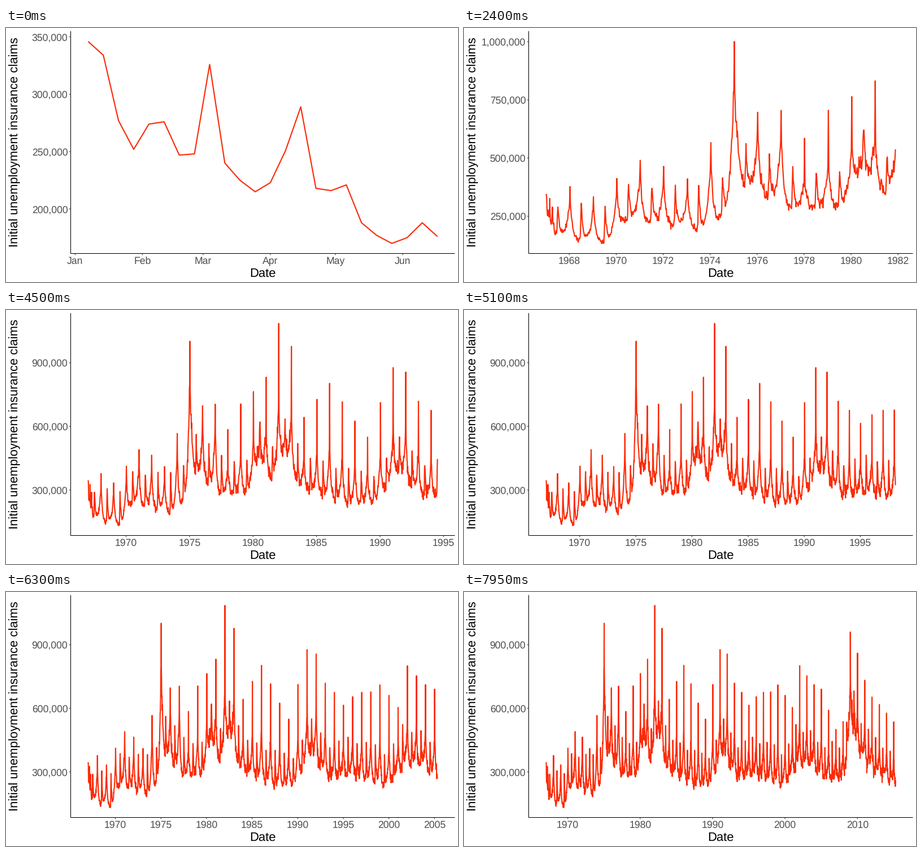
A matplotlib script that plays this animation: 800x450 px, repeating every 8000 ms.

```python
import math

import matplotlib.pyplot as plt
import numpy as np
from matplotlib.animation import FuncAnimation

plt.rcParams["font.family"] = "Liberation Sans"
plt.rcParams["path.simplify"] = False
plt.rcParams["text.hinting"] = "none"

W, H, DPI = 800, 450, 100
PX = 72 / DPI
LEFT, RIGHT, TOP, BOTTOM = 114.5, 794.5, 6, 399.5
START = np.datetime64("1967-01-07")
T0, PER_YEAR = 1967.0164, 52.1775
WEEKS_PER_STEP, STEPS = 47.05, 54

# Claims in thousands: the opening weeks, then turning points by year
OPENING = [346, 334, 277, 252, 274, 276, 247, 248, 326, 240, 225, 215,
           223, 251, 289, 218, 216, 221, 188, 177, 170, 175, 188, 176]
LOW = [(1967.4, 168), (1968.5, 142), (1969.7, 137), (1970.3, 228),
       (1971.6, 225), (1973.7, 182), (1974.7, 260), (1975.15, 490),
       (1975.45, 380), (1977.7, 275), (1979.7, 290), (1980.4, 460),
       (1981.5, 335), (1982.4, 500), (1983.7, 305), (1987.7, 230),
       (1989.7, 245), (1991.3, 385), (1993.7, 260), (1995.5, 285),
       (2000, 230), (2001.5, 330), (2003.5, 325), (2006, 255),
       (2008.2, 275), (2009.1, 580), (2010, 400), (2012, 310), (2015.3, 235)]
WINTER = [(1968, 373), (1969, 337), (1971, 500), (1973, 412), (1974, 584),
          (1975, 970), (1976, 709), (1977, 705), (1978, 580), (1979, 680),
          (1981, 840), (1982, 1074), (1983, 977), (1984, 638), (1986, 805),
          (1989, 545), (1991, 873), (1992, 882), (1993, 706), (1995, 613),
          (1999, 714), (2001, 600), (2002, 800), (2005, 690), (2007, 507),
          (2008, 548), (2009, 957), (2012, 647), (2015, 530)]
SUMMER_RISE = 155


def build_claims():
    rng = np.random.default_rng(7)
    n = len(OPENING) + round(WEEKS_PER_STEP * (STEPS - 1))
    week = np.arange(n)
    low = np.interp(T0 + week / PER_YEAR, *zip(*LOW))
    claims = low * (1 + rng.normal(0, .045, n))

    def weeks_from(t):
        peak = round((t - T0) * PER_YEAR)
        return peak, week - peak

    for year in range(1967, 2015):
        _, u = weeks_from(year + .52)
        rise = SUMMER_RISE + rng.uniform(-25, 25)
        claims += rise * np.where(u < 0, np.exp(-(u / 1.5) ** 2), np.exp(-u / 3.5))

        # A one-week spike on shoulders, which are lower in later years
        peak, u = weeks_from(year + 1.025)
        shoulder = .8 if year < 1977 else .5
        share = shoulder * np.exp(-np.abs(u) / np.where(u < 0, 7, 5))
        share[u == 0] = 1
        claims += (np.interp(year + 1, *zip(*WINTER)) - low[peak]) * share

    claims = np.maximum(claims, 133)
    claims[:len(OPENING)] = OPENING
    return claims * 1000


def number_breaks(lo, hi, m=5):
    """Extended Wilkinson axis breaks."""
    best, breaks = -math.inf, []
    for j in (1, 2):
        for i, q in enumerate((1, 5, 2, 2.5, 4, 3)):
            for k in range(2, 11):
                z0 = math.ceil(math.log10((hi - lo) / (k + 1) / j / q))
                for z in (z0, z0 + 1):
                    step = j * q * 10 ** z
                    first = (math.floor(hi / step) - k + 1) * j
                    last = math.ceil(lo / step) * j
                    for s in range(first, last + 1):
                        a = s * step / j
                        b = a + step * (k - 1)
                        zero = s % j == 0 and a <= 0 <= b
                        simple = 1 - i / 5 - j + zero
                        cover = 1 - .5 * ((hi - b) ** 2 + (lo - a) ** 2) / (.1 * (hi - lo)) ** 2
                        ratio = (k - 1) / (b - a) * (max(b, hi) - min(a, lo)) / (m - 1)
                        dense = 2 - max(ratio, 1 / ratio)
                        score = .25 * simple + .2 * cover + .5 * dense
                        if score > best:
                            best, breaks = score, [a + step * c for c in range(k)]
    return [b for b in breaks if lo <= b <= hi]


def month_number(day):
    """Months since January 1960."""
    date = START + np.timedelta64(math.floor(day), "D")
    return int(date.astype("datetime64[M]").astype(int)) + 120


def date_breaks(lo, hi, target=8):
    """Calendar breaks as (day, label), with about `target` intervals."""
    first, last = month_number(lo), month_number(hi) + 1

    def intervals(step):
        return math.ceil(last / step) - first // step

    step = min((1, 3, 6, 12, 24, 60, 120), key=lambda s: abs(intervals(s) - target))
    result = []
    for month in range(first // step * step, last + 1, step):
        date = np.datetime64(month - 120, "M")
        day = int((date.astype("datetime64[D]") - START).astype(int))
        if lo <= day <= hi:
            text = str(date)
            if step == 1:
                text = "Jan Feb Mar Apr May Jun Jul Aug Sep Oct Nov Dec".split()[month % 12]
            elif step >= 12:
                text = text[:4]
            result.append((day, text))
    return result


def expand(lo, hi):
    pad = (hi - lo) * .05
    return lo - pad, hi + pad


CLAIMS = build_claims()
DAYS = np.arange(len(CLAIMS)) * 7

fig = plt.figure(figsize=(W / DPI, H / DPI), dpi=DPI, facecolor="white")
ax = fig.add_axes([0, 0, 1, 1])
ax.set_xlim(0, W)
ax.set_ylim(H, 0)
ax.axis("off")

axis_style = dict(lw=1.07 * PX, solid_capstyle="butt", solid_joinstyle="miter",
                  snap=False)
curve, = ax.plot([], [], color="#FC2B08", lw=2.13 * PX, solid_capstyle="butt",
                 solid_joinstyle="round")
ax.plot([LEFT, LEFT, RIGHT], [TOP - .5, BOTTOM, BOTTOM], color="black", **axis_style)
ticks, = ax.plot([], [], color="#333333", **axis_style)

title_style = dict(fontsize=22 * PX, color="black", ha="center", va="baseline")
ax.text(454.5, 440.5, "Date", **title_style)
ax.text(21, 202.5, "Initial unemployment insurance claims", rotation=90,
        rotation_mode="anchor", **title_style)
labels = [ax.text(0, 0, "", fontsize=17.6 * PX, color="#4D4D4D", va="baseline")
          for _ in range(30)]


def draw(frame):
    n = len(OPENING) + round(WEEKS_PER_STEP * (frame // 3))
    days, claims = DAYS[:n], CLAIMS[:n]
    x0, x1 = expand(0, days[-1])
    y0, y1 = expand(claims.min(), claims.max())

    def to_x(day):
        return LEFT + (day - x0) / (x1 - x0) * (RIGHT - LEFT)

    def to_y(value):
        return BOTTOM - (value - y0) / (y1 - y0) * (BOTTOM - TOP)

    curve.set_data(to_x(days), to_y(claims))
    placed, tick_x, tick_y = [], [], []
    for value in number_breaks(y0, y1):
        y = to_y(value)
        placed.append((109.3, y + 6.8, f"{value:,.0f}", "right"))
        tick_x += [LEFT - 2.8, LEFT, np.nan]
        tick_y += [y, y, np.nan]
    for day, text in date_breaks(x0, x1):
        x = to_x(day)
        placed.append((x, 418, text, "center"))
        tick_x += [x, x, np.nan]
        tick_y += [BOTTOM, BOTTOM + 2.8, np.nan]
    ticks.set_data(tick_x, tick_y)
    for label in labels:
        label.set_text("")
    for label, (x, y, text, align) in zip(labels, placed):
        label.set_position((x, y))
        label.set_text(text)
        label.set_ha(align)
    return [curve, ticks, *labels]


anim = FuncAnimation(fig, draw, frames=160, interval=50, repeat=True,
                     repeat_delay=0, blit=False)
plt.show()
```
